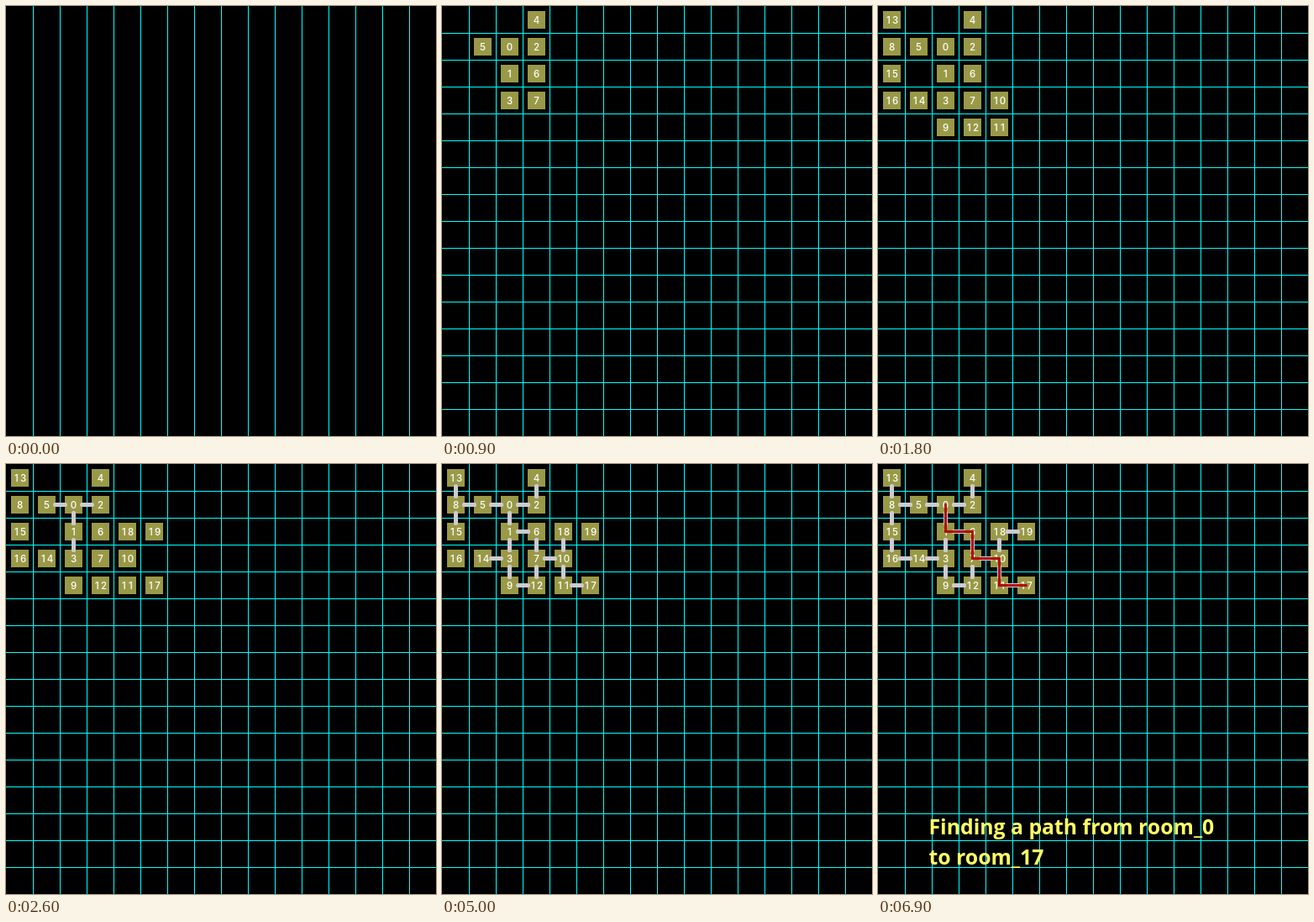
An HTML page with a canvas for the animation above (8100 ms loop, 512 by 512 pixels).

```html
<!DOCTYPE html>
<html lang="en">
<head>
<meta charset="utf-8">
<title>Room path</title>
<style>
html, body { margin: 0; width: 100%; height: 100%; overflow: hidden; background: #000; }
canvas { display: block; }
</style>
</head>
<body>
<canvas id="stage" width="512" height="512"></canvas>
<script>
const ctx = document.getElementById('stage').getContext('2d');
const CELL = 32, SIZE = 512, STEP = 100, LOOP = 8100;

// column and row of each room
const rooms = '21 22 31 23 30 11 32 33 01 24 43 44 34 00 13 02 03 54 42 52'
  .split(' ').map(([col, row]) => ({ x: col * CELL + 16.5, y: row * CELL + 16.5 }));

const pairs = '0-1 0-2 0-5 1-3 1-6 2-4 3-9 3-14 5-8 6-7 7-10 7-12 8-13 8-15 9-12 10-11 10-18 11-17 14-16 15-16 18-19'
  .split(' ').map(p => p.split('-').map(Number));

// every room links to its neighbours in turn, so each pair is visited twice
const visits = rooms.flatMap((_, i) => pairs
  .filter(p => p.includes(i))
  .map(([a, b]) => [i, a === i ? b : a]));

const path = [0, 1, 6, 7, 10, 11, 17];

function line(x1, y1, x2, y2, color, width) {
  ctx.strokeStyle = color;
  ctx.lineWidth = width;
  ctx.beginPath();
  ctx.moveTo(x1, y1);
  ctx.lineTo(x2, y2);
  ctx.stroke();
}

function drawGrid(rows) {
  ctx.fillStyle = '#0ff';
  for (let p = CELL; p < SIZE; p += CELL) {
    ctx.fillRect(p, 0, 1, SIZE);
    if (rows) ctx.fillRect(0, p, SIZE, 1);
  }
}

function drawRoom({ x, y }, i) {
  ctx.fillStyle = '#999947';
  ctx.fillRect(x - 10.5, y - 10.5, 21, 21);
  ctx.fillStyle = '#fff';
  ctx.font = '500 11.5px Inter, sans-serif';
  ctx.textAlign = 'center';
  const digits = [...String(i)];
  digits.forEach((d, k) => ctx.fillText(d, x + (k - (digits.length - 1) / 2) * 8, y + 4));
}

function drawLink([i, j]) {
  const a = rooms[i], b = rooms[j];
  const dx = Math.sign(b.x - a.x) * 10, dy = Math.sign(b.y - a.y) * 10;
  line(a.x + dx, a.y + dy, b.x - dx, b.y - dy, '#cfcacf', 5);
}

function drawCaption() {
  ctx.fillStyle = '#ffff64';
  ctx.font = '700 24.8px "Open Sans", "Noto Sans", sans-serif';
  ctx.textAlign = 'left';
  ctx.fillText('Finding a path from room_0', 60.5, 441);
  ctx.fillText('to room_17', 60.5, 477);
}

function draw(now) {
  const step = Math.floor(now % LOOP / STEP);
  const shown = (list, start) => list.slice(0, Math.max(0, step - start + 1));
  ctx.fillStyle = '#000';
  ctx.fillRect(0, 0, SIZE, SIZE);
  ctx.lineCap = 'round';
  drawGrid(step >= 1);
  shown(rooms, 2).forEach(drawRoom);
  shown(visits, 22).forEach(drawLink);
  if (step >= 62) drawCaption();
  shown(path.slice(1), 64).forEach((to, k) => {
    const a = rooms[path[k]], b = rooms[to];
    line(a.x, a.y, b.x, b.y, '#b40a0a', 3);
  });
}

const start = performance.now();
function tick() {
  draw(performance.now() - start);
  requestAnimationFrame(tick);
}
tick();
</script>
</body>
</html>
```
